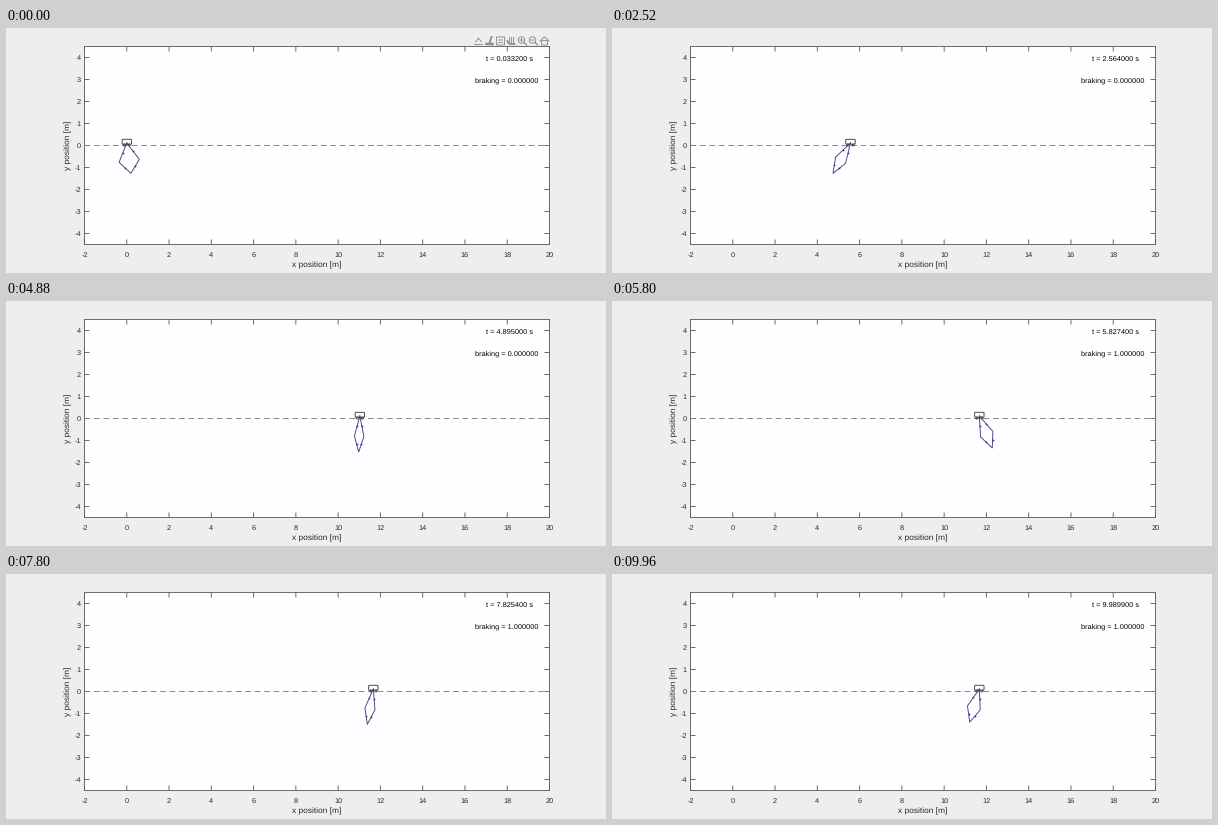
Animation, 600 px wide and 245 px high, one loop 10000 ms. Source, as a matplotlib script:

```python
import numpy as np
import matplotlib.pyplot as plt
from matplotlib.animation import FuncAnimation
from matplotlib.patches import Circle, FancyBboxPatch, Rectangle

W, H, DPI = 600, 245, 100
PX = 72 / DPI  # points per pixel
FRAMES, INTERVAL = 250, 40

LEFT, RIGHT, TOP, BOTTOM = 78.5, 543.5, 18.5, 216.5
SX, SY = (RIGHT - LEFT) / 22, (BOTTOM - TOP) / 9

INK, FRAME, ICON, LINK, CART = "#2a2a2a", "#5e5e5e", "#8c8c8c", "#40407a", "#3c3c3c"
UPPER, LOWER = 0.95, 0.75  # rod lengths in metres
PIVOT_Y = 115.0
BRAKE_AT, STOP_X = 5.0, 11.665

plt.rcParams["font.family"] = "Liberation Sans"
plt.rcParams["text.hinting"] = "none"
plt.rcParams["toolbar"] = "None"

fig = plt.figure(figsize=(W / DPI, H / DPI), dpi=DPI, facecolor="#efedf0")
ax = fig.add_axes([0, 0, 1, 1])
ax.set_xlim(0, W)
ax.set_ylim(H, 0)
ax.axis("off")


def px(x):
    return LEFT + (x + 2) * SX


def py(y):
    return TOP + (4.5 - y) * SY


def line(xs, ys, color=FRAME, width=0.9, **kw):
    return ax.plot(xs, ys, color=color, lw=width * PX, snap=False, **kw)[0]


def outline(patch, color, width=0.9):
    patch.set(fill=False, ec=color, lw=width * PX, snap=False)
    return ax.add_patch(patch)


def label(x, y, text, size=7.4, **kw):
    style = dict(ha="center", va="baseline", color=INK)
    style.update(kw)
    return ax.text(x, y, text, fontsize=size * PX, **style)


# ---- static plot area ----
def draw_axes():
    ax.add_patch(Rectangle((LEFT, TOP), RIGHT - LEFT, BOTTOM - TOP,
                           fc="#fefdff", ec=FRAME, lw=0.9 * PX, snap=False))
    tick = 4.6
    for v in range(-2, 21, 2):
        x = px(v)
        for edge, inward in ((BOTTOM, -tick), (TOP, tick)):
            line([x, x], [edge, edge + inward])
        label(x, 228.6, str(v))
    for v in range(-4, 5):
        y = py(v)
        for edge, inward in ((LEFT, tick), (RIGHT, -tick)):
            line([edge, edge + inward], [y, y])
        label(75, y + 2.8, str(v), ha="right")
    label((LEFT + RIGHT) / 2, 239, "x position [m]", 8.4)
    label(62.4, py(0), "y position [m]", 8.4, rotation=90, va="center")
    line([LEFT, RIGHT], [py(0)] * 2, "#808080", dashes=(6.5, 4),
         dash_capstyle="butt")


# ---- toolbar icons, visible only at the very start ----
def draw_toolbar():
    y = 13
    xs = 472.5 + 11 * np.arange(7)

    def stroke(x, dx, dy, width=0.9):
        return line(x + np.array(dx), y + np.array(dy), ICON, width)

    parts = [stroke(xs[0], [-4, 4], [3.5, 3.5]),
             stroke(xs[0], [-3, 0, 3], [1, -3, 1]),
             stroke(xs[1], [-3, 3], [3, 3], 2.5),
             stroke(xs[1], [0, 2], [2, -4], 1.8),
             outline(Rectangle((xs[2] - 4, y - 4), 8, 8), ICON)]
    parts += [stroke(xs[2], [-2, 2], [d, d]) for d in (-1, 1.5)]
    parts += [stroke(xs[3], [d, d], [-3.5, 2]) for d in (-2, 0, 2)]
    parts.append(stroke(xs[3], [-4, -2, 3], [0, 3, 3], 1.8))
    for x in xs[4:6]:
        parts += [outline(Circle((x - 1, y - 1), 3.2), ICON),
                  stroke(x, [1.4, 4], [1.4, 4], 1.3),
                  stroke(x, [-2.6, 0.6], [-1, -1])]
    parts += [stroke(xs[4], [-1, -1], [-2.6, 0.6]),
              stroke(xs[6], [-4.5, 0, 4.5], [0, -4.2, 0]),
              outline(Rectangle((xs[6] - 3, y - 0.5), 6, 4.5), ICON)]
    return parts


# ---- motion ----
def ease(u):
    return (1 - np.cos(np.pi * np.clip(u, 0, 1))) / 2


# The drive is a cubic through four points; braking slows it evenly to a stop.
drive = np.poly1d(np.polyfit([0.033, 1.565, 3.563, 4.895],
                             [0, 3.51, 7.7, 11.025], 3))
brake_gap = STOP_X - drive(BRAKE_AT)
brake_time = 2 * brake_gap / drive.deriv()(BRAKE_AT)

TURNS = [8.2, -46, -14, -48, 20, -5]  # turning angles while driving
DRIVE_BEAT, FREE_BEAT, FREE_SWING = 1.026, 1.119, 35.5
FREE_FROM = DRIVE_BEAT * (len(TURNS) - 1)


def cart_x(t):
    if t < BRAKE_AT:
        return drive(t)
    return STOP_X - brake_gap * max(0, 1 - (t - BRAKE_AT) / brake_time) ** 2


def turn(k):
    return TURNS[k] if k < len(TURNS) else FREE_SWING * (-1) ** k


def swing(t):
    """Mean angle of the loop, eased from one turning point to the next."""
    if t < FREE_FROM:
        beat = t / DRIVE_BEAT
    else:
        beat = len(TURNS) - 1 + (t - FREE_FROM) / FREE_BEAT
    k = int(beat)
    return np.radians(turn(k) + (turn(k + 1) - turn(k)) * ease(beat - k))


def opening(t):
    """Half angle between the upper rods; it settles, then braking delays it."""
    size = 19.5 + 12 * np.exp(-t / 2)
    phase = 348 * t - 35 * ease(t) - 30 * ease(t - BRAKE_AT)
    return np.radians(size * np.cos(np.radians(phase)))


def linkage(t):
    """Pixel corners of the closed loop: pivot, one side, tip, other side."""
    a, b = swing(t), opening(t)
    reach = UPPER * np.cos(b) + np.sqrt(LOWER ** 2 - (UPPER * np.sin(b)) ** 2)
    polar = [(0, 0), (UPPER, a - b), (reach, a), (UPPER, a + b)]
    x0 = px(cart_x(t))
    return np.array([(x0 + SX * r * np.sin(q), PIVOT_Y + SY * r * np.cos(q))
                     for r, q in polar])


# ---- moving parts ----
draw_axes()
toolbar = draw_toolbar()

body = FancyBboxPatch((0, 111.3), 9.4, 4.9,
                      boxstyle="round,pad=0,rounding_size=0.8", zorder=4)
outline(body, CART)
wheels = [outline(Circle((0, 117), 1.1, zorder=4), CART, 0.8) for _ in range(2)]
loop = line([], [], LINK, 0.9, zorder=5, solid_joinstyle="round")
centres = line([], [], "#3030a8", 0, zorder=6, marker="o", ms=1.8 * PX, mew=0)
clock = label(503, 32.6, "", color="black")
brake = label(500.5, 54.8, "", color="black")


def update(i):
    t = 0.0333 * (round(1.2 * i) + 1) - 0.0001
    corners = linkage(t)
    closed = np.vstack([corners, corners[:1]])
    x0 = corners[0, 0]

    loop.set_data(*closed.T)
    centres.set_data(*((closed[:-1] + closed[1:]) / 2).T)
    body.set_x(x0 - 4.7)
    for wheel, dx in zip(wheels, (-2.5, 2.5)):
        wheel.center = (x0 + dx, 117)
    clock.set_text(f"t = {t:.6f} s")
    brake.set_text(f"braking = {float(t >= BRAKE_AT):.6f}")
    for part in toolbar:
        part.set_visible(i == 0)
    return [loop, centres, body, *wheels, clock, brake, *toolbar]


anim = FuncAnimation(fig, update, frames=FRAMES, interval=INTERVAL,
                     init_func=lambda: update(0), repeat=True, repeat_delay=0,
                     blit=False)
plt.show()
```
